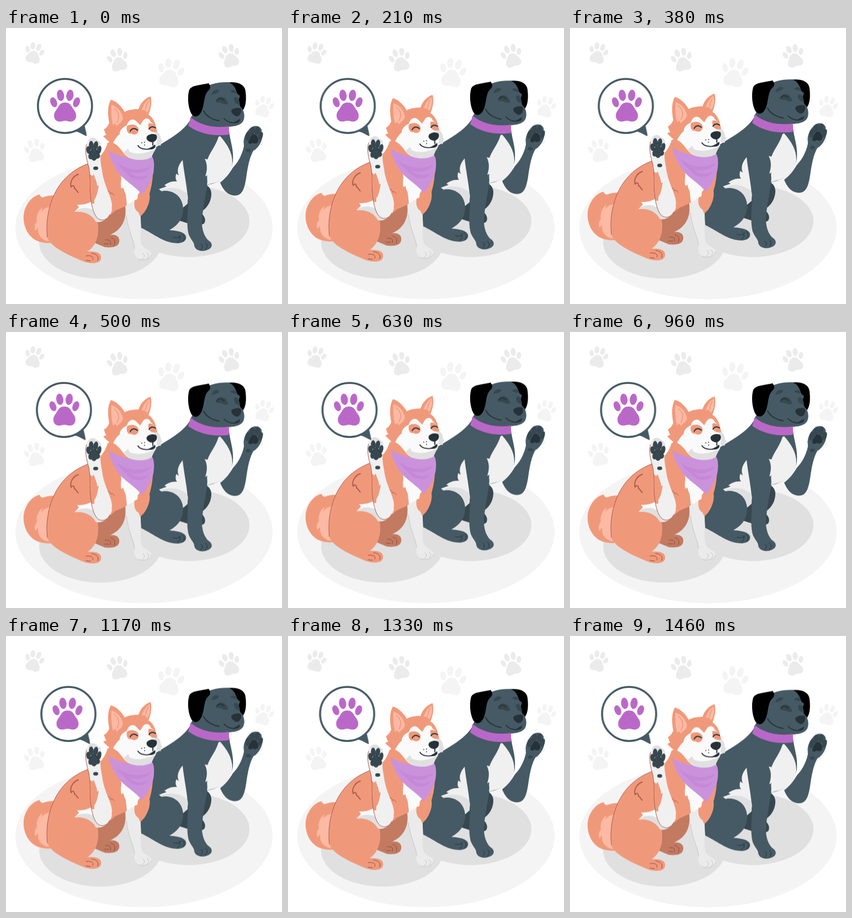
An HTML page for the animation above (1.5 s loop, 500x500 px).

```html
<!DOCTYPE html>
<html lang="en">
<head>
<meta charset="utf-8">
<title>Waving dogs</title>
<style>
html, body { margin: 0; width: 100%; height: 100%; overflow: hidden; background: #fff; }
svg { display: block; width: 100vw; height: 100vh; }
.float { animation: float 1.5s linear infinite; }
.sway { --k: 1px; animation: sway 1.5s linear infinite; }
.sway.soft { --k: .7px; }
@keyframes float { 50% { transform: translateY(-10px); } }
@keyframes sway {
  0%, 100% { transform: none; }
  8% { transform: translateX(calc(4 * var(--k))); }
  13.9% { transform: translateX(calc(1.5 * var(--k))); }
  25% { transform: translateX(calc(-5.6 * var(--k))); }
  28% { transform: translateX(calc(-6 * var(--k))); }
  41.7% { transform: translateX(calc(4.5 * var(--k))); }
  44% { transform: translateX(calc(5.5 * var(--k))); }
  59% { transform: translateX(calc(-5 * var(--k))); }
  63.9% { transform: translateX(calc(-1.6 * var(--k))); }
  77.8% { transform: translateX(calc(6.4 * var(--k))); }
  92% { transform: translateX(calc(-1.5 * var(--k))); }
  97.2% { transform: translateX(calc(.3 * var(--k))); }
}
.slate { fill: #455a64; }
.deep { fill: #37474f; }
.ink { fill: #263238; }
.coat { fill: #f0997a; }
.pink { fill: #fcb9a3; }
.rust { fill: #c27a61; }
.fur { fill: #f0f0f0; }
.leg { fill: #ebebeb; }
.snow { fill: #fafafa; }
.gray { fill: #e0e0e0; }
.plum { fill: #ba68c8; }
.scarf { fill: #cb92dc; }
.line { fill: none; stroke: #263238; stroke-width: 1; stroke-linecap: round; stroke-linejoin: round; }
.bold { stroke-width: 1.9; }
.red { stroke: #a9594f; }
.brown { stroke: #8f4b3b; }
.pale { stroke: #c4c4c4; }
.claw { stroke: #ebebeb; stroke-width: 2; }
</style>
</head>
<body>
<svg viewBox="0 0 500 500" preserveAspectRatio="none">
  <defs>
    <g id="paw">
      <path d="M0-6C-8-6-11-1-13 3C-16 8-20 11-20 18C-20 26-14 29-8 28.500C-4 28-3 27 0 27S4 28 8 28.500C14 29 20 26 20 18C20 11 16 8 13 3C11-1 8-6 0-6Z"/>
      <ellipse cx="-20.700" cy="-6.500" rx="5.800" ry="9.300" transform="rotate(-22 -20.700 -6.500)"/>
      <ellipse cx="-8.300" cy="-19" rx="6.500" ry="10.300" transform="rotate(-8 -8.300 -19)"/>
      <ellipse cx="8.700" cy="-19" rx="6.500" ry="10.300" transform="rotate(8 8.700 -19)"/>
      <ellipse cx="20.700" cy="-6.500" rx="5.800" ry="9.300" transform="rotate(22 20.700 -6.500)"/>
    </g>
  </defs>

  <ellipse cx="250" cy="362" rx="233" ry="129.500" fill="#f4f4f4"/>
  <g fill="#e0e0e0">
    <ellipse cx="171" cy="388" rx="111" ry="66"/>
    <ellipse cx="331" cy="350" rx="110" ry="65"/>
  </g>
  <g fill="#ebebeb">
    <use href="#paw" transform="translate(51 45.500) rotate(14) scale(.64)"/>
    <use href="#paw" transform="translate(203 57.500) rotate(-13) scale(.7)"/>
    <use href="#paw" transform="translate(405.500 50.500) rotate(-15) scale(.7)"/>
  </g>
  <g fill="#f4f4f4">
    <use href="#paw" transform="translate(298 81) rotate(11) scale(.88)"/>
    <use href="#paw" transform="translate(467 142.500) rotate(14) scale(.64)"/>
    <use href="#paw" transform="translate(52.500 222) rotate(-12) scale(.7)"/>
  </g>

  <g class="float">
    <!-- dark dog -->
    <g>
      <path class="deep" d="M350 283C364 281 373 290 372 302C371 318 362 328 352 334C360 340 363 348 359 354C352 359 340 357 333 355L314 349L322 320Z"/>
      <path class="line" d="M352 356C355 352 353 349 348 348M345 357C347 353 345 351 341 350"/>
      <path class="slate" d="M334 166C322 188 292 203 262 222L240 300L245 362C270 374 286 390 312 390C324 389 329 382 325 375C320 368 305 367 296 366C311 358 322 345 321 324L329 302C332 322 325 350 331 374C335 384 341 388 341 394C343 404 356 406 365 402C376 398 374 389 367 385C360 379 354 365 355 348C357 325 362 300 365 284C385 281 407 268 411 242C413 220 406 205 404 186Z"/>
      <path class="fur" d="M320 239C312 248 309 258 313 267L308.500 264C306 271 308 276 310 278C300 277 292 281 287 285L291 287L277 292L282 295.500C300 292 319 303 321 325L329 318C331 300 323 268 320 239Z"/>
      <path class="gray" d="M279 294C298 286 316 290 328 300L329 318L321 325C319 303 300 292 282 295.500Z"/>
      <path class="fur" d="M388 196C401 211 410 225 410 243C409 264 398 277 364 284C366 276 363 271 365 267L361 269C365 257 365 247 360 237L365 238C371 222 380 214 385 197Z"/>
      <path class="slate" d="M432 208C430 225 422 242 411 253C404 265 397 273 388 280C393 292 401 304 416 303.500C428 303 432 291 435 272C438 251 441 234 449 221Z"/>
      <path class="slate" d="M431 213C429 202 433 192 440 184C447 175 461 175 464 187C467 199 461 212 452 220C444 226 434 221 431 213Z"/>
      <g class="deep">
        <ellipse cx="438" cy="196" rx="4.500" ry="8" transform="rotate(10 438 196)"/>
        <ellipse cx="446" cy="187" rx="4.500" ry="8" transform="rotate(12 446 187)"/>
        <ellipse cx="455" cy="186" rx="4.500" ry="8" transform="rotate(12 455 186)"/>
        <ellipse cx="461" cy="195" rx="4.200" ry="8" transform="rotate(16 461 195)"/>
      </g>
      <path class="ink" d="M448 193C443 194 443 199 440 203C437 209 441 212 447 208C453 211 458 208 457 202C456 197 453 192 448 193Z"/>
      <ellipse class="deep" cx="439" cy="221.500" rx="4.500" ry="3"/>
      <path class="line claw" d="M429 206l1 4M444 179l2-2M455 177l1-1M464 185l0 3M464 207l-1 4"/>

      <path fill="#000" d="M398 99C418 96 433 101 434 115C436 132 434 145 427 151L408 120Z"/>
      <path class="slate" d="M352 112C368 101 388 97 403 98.500C412 101 416 109 419 119L424 123C420 132 422 141 428 146C434 156 432 168 427 172C420 178 411 178 404 179L404 184C380 188 350 180 333 165C342 152 348 140 352 112Z"/>
      <path fill="#000" d="M367 100C372 106 370 111 366 114C358 122 360 136 355 149C350 161 343 163 337 157C330 147 328 125 332 112C337 103 351 104 367 100Z"/>
      <g class="deep">
        <path d="M372 121C374 113 381 110 386 113C386 118 379 119 372 121Z"/>
        <path d="M406 115C410 110 417 112 419 118C414 119 410 117 406 115Z"/>
        <path d="M380 134C383 122 396 122 401 133C405 139 398 139 393 137C388 134 384 136 380 134Z"/>
        <path d="M413 127C418 122 423 128 424 140C420 137 413 138 413 127Z"/>
      </g>
      <path class="line bold" d="M382 131C386 126 391 127 395 131M358 150C363 161 377 167 386 168M395 164C401 171 413 174 420 170"/>
      <path class="ink" d="M409 148C414 144 424 143 426 147C427 155 422 161 417 160C412 158 406 152 409 148Z"/>
      <path class="ink" d="M413 170C418 169 420 166 424 165C424 170 420 174 413 170Z"/>
      <path class="plum" d="M335 162C352 177 380 182 404 178L404 193C378 197 350 192 330 177Z"/>
      <path class="line" d="M303 379C310 381 315 380 317 376M311 387C316 385 317 380 313 376M320 386C325 382 323 376 319 374M352 402C357 399 357 393 353 391M361 401C366 398 365 391 361 389"/>
    </g>

    <!-- orange dog -->
    <g>
      <path class="coat" d="M92 304C84 302 74 304 66 307C62 305 60 303 62 301.500C48 303 34 320 32 339C30 360 42 387 70 389C82 391 88 388 92 380Z"/>
      <path class="pink" d="M80 324C72 325 68 328 64 333L66 325C58 331 54 342 56 351C52 355 51 362 53 367L58 362C57 373 62 382 74 386L90 387Z"/>
      <path class="rust" d="M180 338L216 322C219 346 211 365 188 375C200 373 207 379 205 388C203 398 189 398 179 397L160 389L160 352Z"/>
      <path class="line brown" d="M180 384C188 383 191 386 189 392M190 380C197 381 199 387 196 393M178 391L186 391"/>
      <path class="coat" d="M184 208C180 222 172 237 148 246C125 255 109 268 97 285C80 309 71 345 75 379C80 396 108 409 138 422C152 428 170 428 172 418C174 408 165 404 148 405C161 396 168 380 167 362C167 352 165 346 163 344L185 342L198 331L216 323L234 330C238 336 241 340 244 341L248 336C258 325 262 310 260 300C266 280 268 260 264 232Z"/>
      <path class="line red" stroke-width=".8" d="M148 246C125 255 109 268 97 285C80 309 71 345 75 379"/>
      <path class="snow" d="M156 314C146 319 138 321 129 320L132 325L124 333C143 330 158 340 163 351C176 354 190 342 192 328Z"/>
      <path class="gray" d="M124 333C140 320 160 326 180 346C174 350 168 351 163 351C157 339 143 331 124 333Z"/>
      <path class="snow" d="M206 262C212 270 206 281 209 291L213 289C213 294 216 298 217 302L220 330L240 330L236 316C244 308 252 292 256 270L240 245Z"/>
      <path class="leg" d="M217 322C217 330 217 336 218 345C222 372 232 385 233 399C230 412 237 420 250 420C262 419 267 412 262 406C256 400 248 399 245 390C242 372 246 352 243 334C240 325 235 320 234 312Z"/>
      <path class="coat" d="M256 270C252 282 246 294 239 302L238 310L233 312C231 322 234 331 240 334L243 341C254 334 259 320 259 302C264 285 266 268 265 255Z"/>
      <path class="line pale" d="M218 340C222 370 232 385 233 399M247 418C252 416 252 411 248 408M256 417C260 413 259 409 255 407M240 419C250 422 261 419 264 411"/>
      <path class="line brown" d="M145 413C154 411 160 415 157 420M155 408C165 409 169 415 166 421M145 421L153 422"/>
      <path class="line red bold" d="M131 265C122 268 115 278 118 288C121 284 124 285 124 291C126 290 128 296 131 298"/>
      <path class="line red" d="M183 295C188 293 190 302 190 300C191 298 194 300 196 303"/>

      <path class="fur" d="M145 214C145 204 152 198 159 200C168 201 174 212 173 222C170 234 171 242 174 258C177 286 192 305 192 322C191 337 184 348 175 348C164 348 158 334 155 318C150 295 153 275 150 252C146 238 143 226 145 214Z"/>
      <path class="coat" d="M151 264L156 268L159 265C161 273 165 278 165 286L168 285C166 298 164 306 160 311L160 318L155 318C151 297 153 280 151 264Z"/>
      <path class="line red" d="M146 211C142 222 146 238 150 252C154 270 150 294 155 318C159 340 166 348 175 348C181 347 185 344 188 338"/>
      <path class="gray" d="M150 207C148 201 154 198 160 199L171 207L173 214L165 206Z"/>
      <g class="deep">
        <ellipse cx="149.500" cy="221" rx="4" ry="7" transform="rotate(-6 149.500 221)"/>
        <ellipse cx="154.500" cy="212.500" rx="4.300" ry="8" transform="rotate(-3 154.500 212.500)"/>
        <ellipse cx="162.500" cy="213" rx="4.300" ry="8" transform="rotate(12 162.500 213)"/>
        <ellipse cx="168.500" cy="221" rx="4" ry="8" transform="rotate(14 168.500 221)"/>
        <path d="M159 218C154 218 154 224 151 228C147 235 151 239 155 237.500C158 242 162 241 164 237C172 236 172 230 167 227C165 222 164 218 159 218Z"/>
        <ellipse cx="162.500" cy="254" rx="4.500" ry="3.200"/>
      </g>
      <path class="line" stroke-width=".8" d="M155 221C152 228 151 229 149 231M163 221C166 226 168 228 170 230"/>

      <path class="scarf" d="M186 221C203 234 238 242 264 232C269 238 269 250 267 263C262 279 255 292 246 302C236 287 212 276 200 257C192 243 186 231 186 221Z"/>
      <path fill="#bf80d2" d="M200 243C216 255 240 262 264 250C253 264 236 265 224 261C234 272 248 270 258 266C250 278 236 276 226 271C218 262 208 256 200 243Z" opacity=".5"/>

      <path class="coat" d="M187 172C184 155 184 140 190 130C200 132 210 143 215 152C224 147 235 147 240 147C244 135 252 127 262 124C265 136 262 148 258 157C266 162 271 171 273 186L270 215L216 232C204 228 196 224 189 222L194 216L184 210L187 206C182 202 179 199 176 196L182 193C178 190 180 187 177 184C182 181 185 177 187 172Z"/>
      <path class="pink" d="M191 139C190 153 191 166 194 176L198 173L201 178C204 172 208 174 212 164C210 151 202 143 191 139Z"/>
      <path class="pink" d="M260 128C253 133 248 140 246 149L251 148L256 153C261 146 262 137 260 128Z"/>
      <path class="line" style="stroke:#e18467" d="M196 146C204 151 207 161 201 171M258 133C255 138 253 142 253 147"/>
      <path class="snow" d="M219 176C211 180 206 185 206 192C201 196 197 202 194 208C203 212 208 220 215 229C227 242 250 240 264 233L273 213L281 212C278 209 283 207 283 204C278 200 284 196 274 187C271 178 267 173 262 170C260 163 252 162 248 168L243 176L236 169C230 162 221 167 219 176Z"/>
      <path class="gray" d="M213 226C216 222 219 221 221 218L224 224C232 229 250 230 270 219L273 212L281 213C277 210 283 207 283 204C278 200 284 195 272 186L268 188L274 198L272 218C268 226 263 229 264 234C250 242 226 241 213 226Z"/>
      <path class="coat" d="M219 178C224 173 237 174 240 182C242 191 233 196 227 191C222 193 217 187 219 178Z"/>
      <path class="coat" d="M258 173C266 171 272 177 274 188C266 190 256 188 258 173Z"/>
      <path class="line bold" d="M225 187C228 181 234 181 238 185M259 183C262 178 267 178 271 181"/>
      <path class="ink" d="M255 197C258 192 270 190 273 195C275 201 270 207 264 207C258 206 253 202 255 197Z"/>
      <path class="line bold" d="M239 213C243 220 258 222 269 216M266 206L266 212"/>
      <path class="ink" d="M257 219C262 217 266 214 270 211C273 217 266 222 257 219Z"/>
      <g class="ink">
        <circle cx="246" cy="208" r=".9"/>
        <circle cx="251" cy="207" r=".9"/>
        <circle cx="251" cy="212" r=".9"/>
      </g>
    </g>
  </g>

  <g class="sway">
    <path class="slate" d="M124 187C133 188 138 193 146 196C146 189 143 182 142 174Z"/>
    <circle cx="106.800" cy="141.200" r="49" fill="#fff" stroke="#455a64" stroke-width="3.600"/>
  </g>
  <g class="sway soft">
    <use class="plum" href="#paw" x="107" y="141"/>
  </g>
</svg>
</body>
</html>
```
